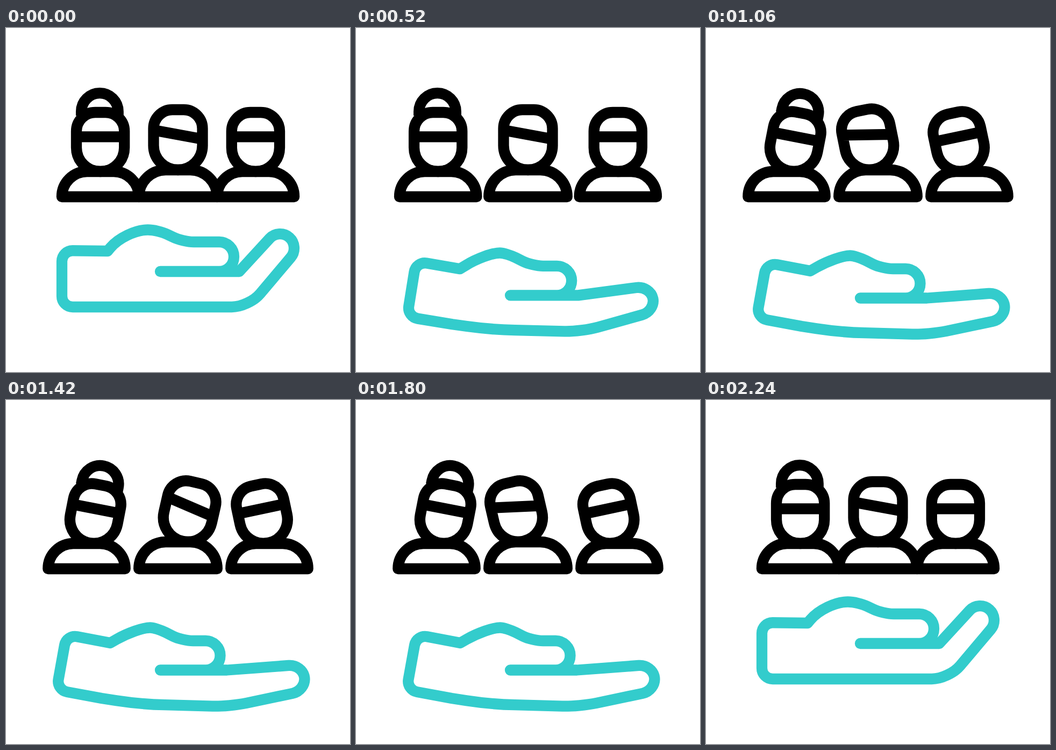
An HTML page for the animation above (2400 ms loop, 640 px wide and 640 px high).

```html
<!DOCTYPE html>
<html lang="en">
<head>
<meta charset="utf-8">
<title>Hand holding people</title>
<style>
html, body { margin: 0; width: 100%; height: 100%; overflow: hidden; background: #fff; }
svg { display: block; width: 100%; height: 100%; }
path { fill: none; stroke-width: 20.3; stroke-linejoin: round; }
.ink { stroke: #000; }
.teal { stroke: #33cccc; stroke-linecap: round; }
</style>
</head>
<body>
<svg viewBox="0 0 640 640">
  <g id="people" class="ink"></g>
  <path id="hand" class="teal"/>
  <path id="sparks" class="teal"/>
</svg>
<script>
const LOOP = 2400, STEP = 20;
const byId = id => document.getElementById(id);
const mix = (a, b, p) => a + (b - a) * p;

function ease(t, from, to) {
  const u = Math.min(1, Math.max(0, (t - from) / (to - from)));
  return u * u * (3 - 2 * u);
}

// Corners of the hand: raised x, y, lowered x, y, and how much of each corner is rounded off.
const HAND = [
  [287, 453, 287, 502.5, 0],      // palm crease
  [434, 453, 411, 502.5, 0],
  [508, 372.5, 552, 492, 26],     // fingertips
  [546.5, 407, 558.5, 540.5, 26],
  [452, 519, 416, 570.5, 32],     // back of the hand
  [260, 519, 250, 566, 45],
  [191, 519, 178, 555, 0],
  [104, 519, 94, 539.5, 20],      // wrist
  [104, 414, 112.5, 436.5, 20],
  [189, 415, 194, 452, 0],        // thumb
  [222, 375.5, 244, 423.5, 44],
  [283, 375.5, 279, 423.5, 20],
  [329, 398, 328, 448, 20],
  [424, 398, 398.5, 448, 27.3],
  [424, 453, 398.5, 502.5, 27.3],
  [397, 453, 371.5, 502.5, 0],
];

// Polyline with rounded corners; two corners on a short edge share its length.
function roundedPath(points) {
  const toward = (a, b, d) => {
    const len = Math.hypot(b.x - a.x, b.y - a.y) || 1;
    return `${mix(a.x, b.x, d / len)} ${mix(a.y, b.y, d / len)} `;
  };
  const room = (a, b) => {
    const len = Math.hypot(b.x - a.x, b.y - a.y);
    return Math.min(a.cut, len * a.cut / (a.cut + b.cut));
  };
  return points.map((p, i) => {
    const prev = points[i - 1], next = points[i + 1];
    if (!prev || !next || !p.cut) return `${prev ? "L" : "M"}${p.x} ${p.y} `;
    const before = room(p, prev), after = room(p, next);
    return "L" + toward(p, prev, before) + "C" + toward(p, prev, before * 0.45) +
      toward(p, next, after * 0.45) + toward(p, next, after);
  }).join("");
}

const handPath = lowered => roundedPath(HAND.map(([x0, y0, x1, y1, cut]) =>
  ({ x: mix(x0, x1, lowered), y: mix(y0, y1, lowered), cut })));

// People are drawn around x = 0.
const bodyPath = (half, top) => {
  const r = 314 - top;
  return `M${-half} 314 A${r} ${r} 0 0 1 ${r - half} ${top} H${half - r} A${r} ${r} 0 0 1 ${half} 314 Z`;
};

const headPath = (half, top, chin, slant) =>
  `M${-half} ${chin - half} V${top + 35} a35 35 0 0 1 35 -35 H${half - 35} a35 35 0 0 1 35 35
   V${chin - half} A${half} ${half} 0 0 1 ${-half} ${chin - half} Z
   M${-half} ${(top + chin) / 2 - 9.7 - slant} L${half} ${(top + chin) / 2 - 9.7 + slant}`;

const BUN = "M-35.5 163 V155.5 a34.3 34.3 0 0 1 68.6 0 V163";
const outerBody = bodyPath(71.7, 267), outerHead = headPath(44.6, 157, 267, 0);

function addPerson(body, head) {
  byId("people").insertAdjacentHTML("beforeend", `<g><path d="${body}"/><path d="${head}"/></g>`);
  const group = byId("people").lastElementChild;
  return (x, tilt, shift) => {
    group.setAttribute("transform", `translate(${x} 0)`);
    group.lastElementChild.setAttribute("transform", `translate(${shift} 0) rotate(${tilt} 0 212)`);
  };
}

const poseLeft = addPerson(outerBody, outerHead + BUN);
const poseMiddle = addPerson(bodyPath(72.8, 264), headPath(45.5, 152, 264, 8.4));
const poseRight = addPerson(outerBody, outerHead);

function draw(now) {
  const t = Math.floor(now % LOOP / STEP) * STEP;
  const back = ease(t, 1800, 2200);
  const open = ease(t, 200, 600) - back;
  const lean = ease(t, 760, 1000) - back;
  const sway = 2 * ease(t, 1000, 1400) - 2 * ease(t, 1400, 1800) - ease(t, 600, 1000) + back;

  const gap = 144.4 + 25.6 * open;
  poseLeft(320 - gap, 11 * lean, 15.5 * lean);
  poseMiddle(320, 13 * sway, 20 * sway);
  // the right head gives way when the middle one sways towards it
  poseRight(320 + gap, -12 * lean, (3.2 * (sway + 1) - 19.4) * lean);
  byId("hand").setAttribute("d", handPath(open));

  const tip = ease(t, 1800, 2040), tail = ease(t, 2000, 2240);
  const spark = (x, y, dx, dy) =>
    `M${x + dx * tail} ${y + dy * tail} L${x + dx * tip} ${y + dy * tip}`;
  byId("sparks").setAttribute("d",
    tip > tail ? spark(309, 88, -14, -29) + spark(339, 86.2, 13, -29) : "");
  requestAnimationFrame(draw);
}
draw(performance.now());
</script>
</body>
</html>
```
